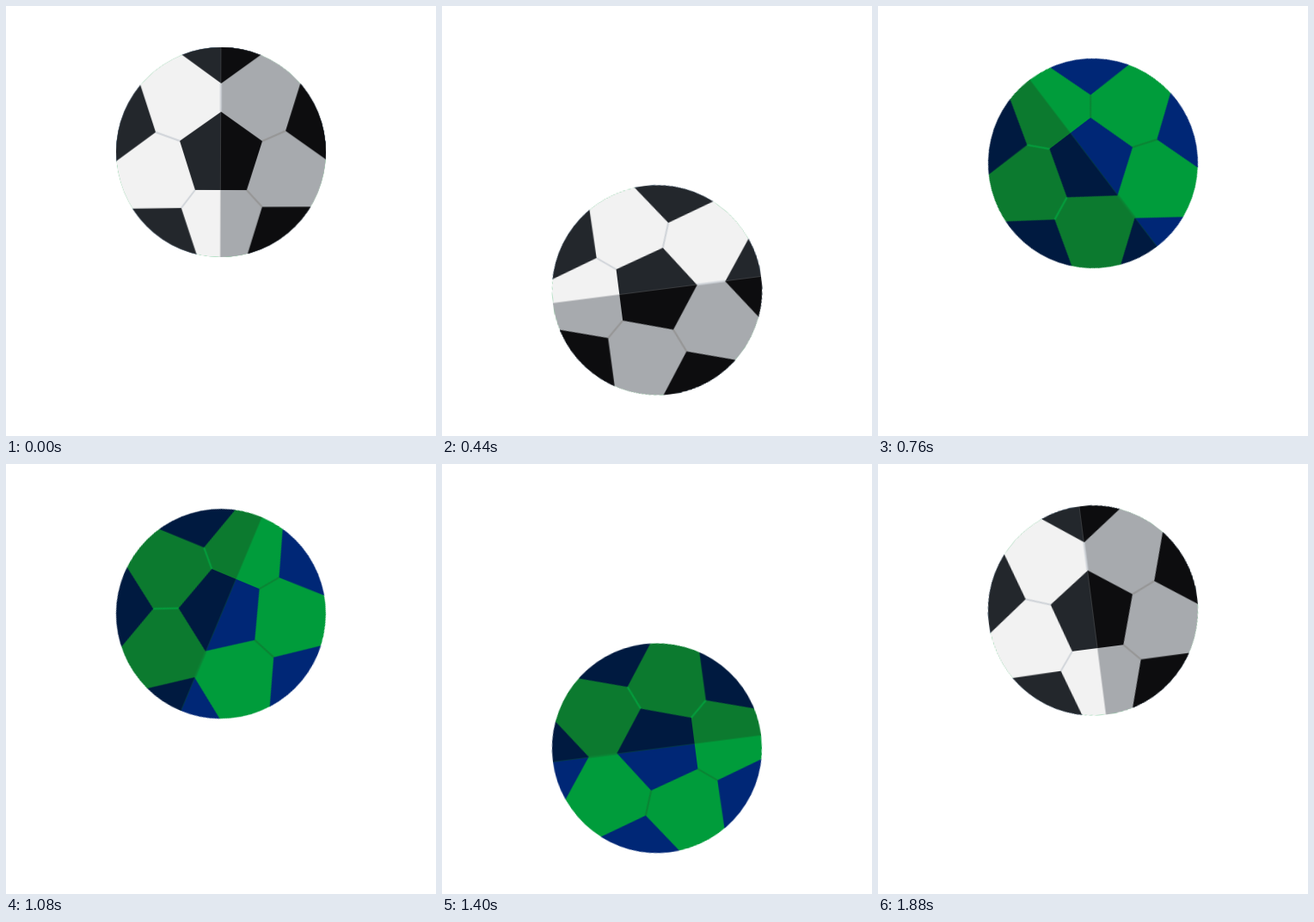
These frames come from a looping animation (500x500 px, 1920 ms). An HTML page:

```html
<!DOCTYPE html>
<html lang="en">
<head>
<meta charset="utf-8">
<title>Bouncing ball</title>
<style>
  html, body { margin: 0; width: 100%; height: 100%; overflow: hidden; background: #fff; }
  svg { display: block; width: 100vw; height: 100vh; }

  .bounce { animation: bounce 960ms infinite; }
  .spin { animation: spin 1920ms linear infinite; }
  .classic { animation: swap 1920ms step-end infinite; }

  .classic { --base: #f2f2f2; --patch: #23272c; --seam: #d0d4d9;
             --base-dim: #a7aaae; --patch-dim: #0d0d0f; --seam-dim: #969696; }
  .green { --base: #009c3b; --patch: #002776; --seam: #0a8434;
           --base-dim: #0c7a2f; --patch-dim: #001a40; --seam-dim: #049c3c; }

  .base { fill: var(--base); }
  .patch { fill: var(--patch); }
  .seam { stroke: var(--seam); }
  .dim .base { fill: var(--base-dim); }
  .dim .patch { fill: var(--patch-dim); }
  .dim .seam { stroke: var(--seam-dim); }
  .seam { fill: none; stroke-width: 2; }

  @keyframes bounce {
    0% { transform: translate(250px, 170px); animation-timing-function: cubic-bezier(1, 0, .833, .833); }
    50% { transform: translate(250px, 372px); animation-timing-function: cubic-bezier(.167, .167, 0, 1); }
    100% { transform: translate(250px, 170px); }
  }
  @keyframes spin {
    from { transform: rotate(0deg); }
    to { transform: rotate(360deg); }
  }
  @keyframes swap {
    0% { visibility: visible; }
    25% { visibility: hidden; }
    75%, 100% { visibility: visible; }
  }
</style>
</head>
<body>
<svg viewBox="0 0 500 500">
  <defs>
    <clipPath id="round"><circle r="122"/></clipPath>
    <clipPath id="half"><rect x="-.5" y="-130" width="140" height="260"/></clipPath>
    <circle id="disc" r="122"/>
    <path id="patches" d="M0-47 48-13 30 44-30 44-48-13Z
      M0-80 69-130-69-130Z
      M75-25 100.5-107.5 145.5 24.5Z
      M48 63.5 132 63 22.5 147Z
      M-46 65-131.5 66.5-19 146Z
      M-76-23-103-105.5-145 28Z"/>
    <path id="seams" d="M48-13 75-25M30 44 48 63.5M-30 44-46 65M-48-13-76-23"/>
    <path id="top-seam" d="M-.5-80V-47"/>
  </defs>

  <g class="bounce">
    <g class="spin">
      <g class="green" clip-path="url(#round)">
        <use class="base" href="#disc"/>
        <use class="seam" href="#seams"/>
        <use class="patch" href="#patches"/>
        <g class="dim" clip-path="url(#half)">
          <use class="base" href="#disc"/>
          <use class="seam" href="#seams"/>
          <use class="patch" href="#patches"/>
        </g>
        <use class="seam" href="#top-seam"/>
      </g>
      <g class="classic" clip-path="url(#round)">
        <use class="base" href="#disc"/>
        <use class="seam" href="#seams"/>
        <use class="patch" href="#patches"/>
        <g class="dim" clip-path="url(#half)">
          <use class="base" href="#disc"/>
          <use class="seam" href="#seams"/>
          <use class="patch" href="#patches"/>
        </g>
        <use class="seam" href="#top-seam"/>
      </g>
    </g>
  </g>
</svg>
</body>
</html>
```
